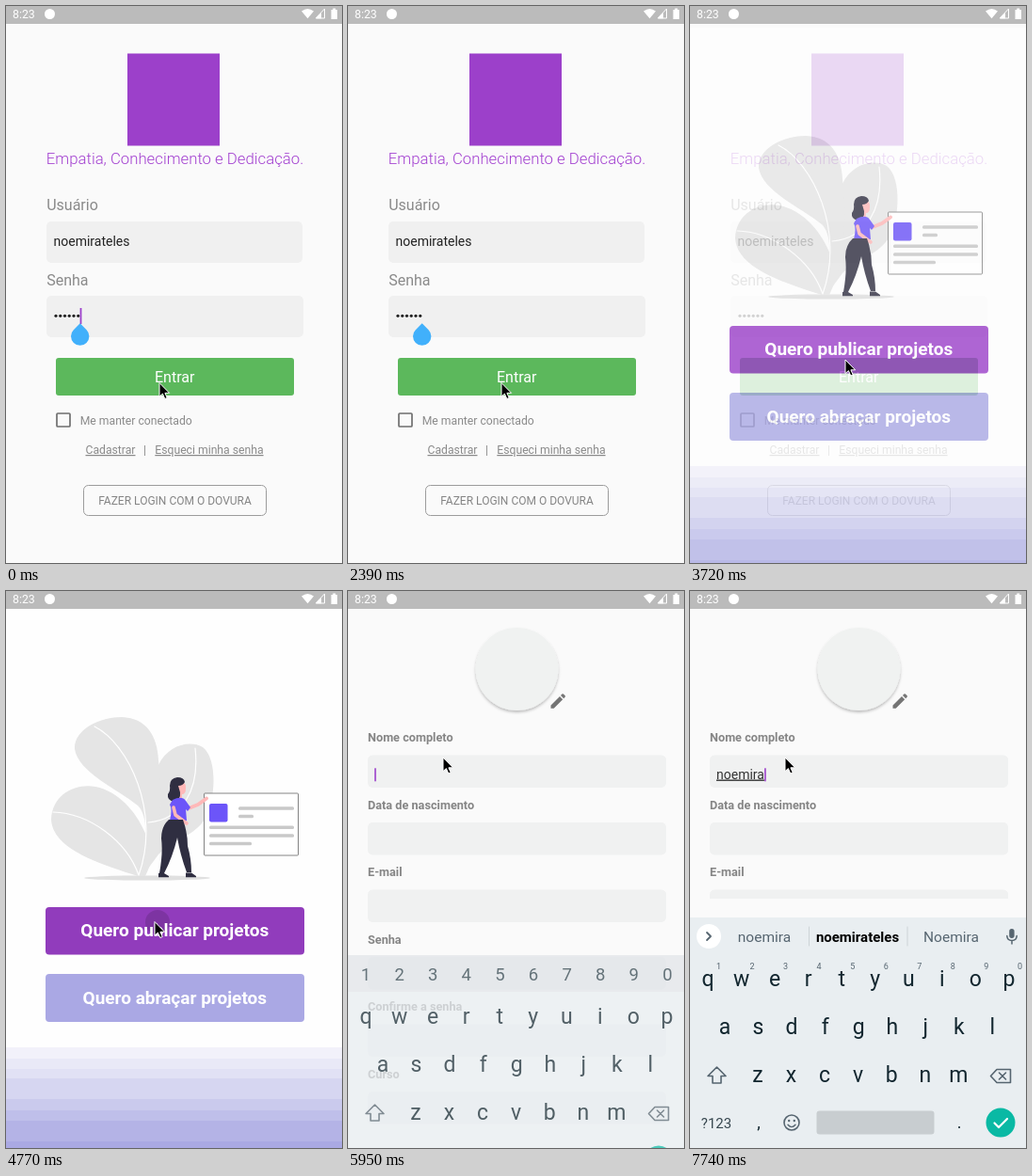
Animation, 357 px wide and 592 px high, one loop 8 s. Source, as an HTML page:

```html
<!DOCTYPE html>
<html lang="pt-BR">
<head>
<meta charset="utf-8">
<title>Login e cadastro</title>
<style>
html, body { margin: 0; width: 100%; height: 100%; overflow: hidden; background: #fafafa; }
svg { display: block; width: 100vw; height: 100vh; }
text { font-family: Roboto, "Noto Sans", sans-serif; white-space: pre; }
</style>
</head>
<body>
<svg id="stage" viewBox="0 0 357 592" xmlns="http://www.w3.org/2000/svg"></svg>
<script>
const LOOP = 8000;
const USER = 'noemirateles', NAME = 'noemira';
const PURPLE = '#9c40ca', DARK = '#2f2e41', SKIN = '#ffb8b8', VIOLET = '#6c55f9';

// Markup helpers
const rect = (x, y, w, h, fill, r = 0, more = '') =>
  `<rect x="${x}" y="${y}" width="${w}" height="${h}" rx="${r}" fill="${fill}" ${more}/>`;
const circle = (x, y, r, fill, more = '') =>
  `<circle cx="${x}" cy="${y}" r="${r}" fill="${fill}" ${more}/>`;
const path = (d, fill, more = '') => `<path d="${d}" fill="${fill}" ${more}/>`;
const line = (d, color, w, more = '') =>
  path(d, 'none', `stroke="${color}" stroke-width="${w}" stroke-linecap="round" stroke-linejoin="round" ${more}`);
const text = (s, x, y, size, fill, more = '') =>
  `<text x="${x}" y="${y}" font-size="${size}" fill="${fill}" ${more}>${s}</text>`;
const mid = (s, x, y, size, fill, more = '') =>
  text(s, x, y, size, fill, 'text-anchor="middle" ' + more);
const group = (id, body, more = '') => `<g id="${id}" ${more}>${body}</g>`;
const BOLD = 'font-weight="700"', LINK = 'style="text-decoration: underline .8px"';
const times = (n, f) => Array.from({ length: n }, (_, i) => f(i)).join('');

const statusBar = () =>
  rect(0, 0, 357, 19, '#bbbbbb') +
  text('8:23', 7, 13, 12.3, '#fff') +
  circle(46.5, 8.5, 5.5, '#fff') +
  path('M314 5.5Q320.5 0.5 327 5.5L320.5 13.3Z', '#fff') +
  path('M329.5 13V12.5L338.5 3V13Z', 'none', 'stroke="#fff"') +
  path('M329 13.3L335 7V13.3Z', '#fff') +
  path('M345.5 4H347.3V2.5H350.2V4H352V14H345.5Z', '#fff');

const login = () => {
  const gray = '#8a8a8a';
  return rect(0, 0, 357, 592, '#fafafa') +
    rect(129, 50.5, 98, 98, PURPLE) +
    mid('Empatia, Conhecimento e Dedicação.', 179.5, 168, 16.75, '#a23fd0', 'font-weight="300"') +
    text('Usuário', 43.2, 217, 16, gray) +
    rect(43, 229, 272, 44, '#f0f0f0', 5) +
    text(USER, 50.5, 255, 14, '#222') +
    text('Senha', 43.2, 296.7, 16, gray) +
    rect(43, 308, 273, 44, '#f0f0f0', 5) +
    times(6, i => circle(53 + i * 4.75, 329.3, 1.6, '#222')) +
    rect(78.6, 321, 1.8, 17, PURPLE, 0, 'id="passCaret"') +
    path('M78.7 337.2L85.6 344.2A9.7 9.7 0 1 1 71.8 344.2Z', '#41b0fb', 'id="handle"') +
    rect(53, 374, 253, 40, '#5cb85c', 3) +
    mid('Entrar', 179.2, 399.8, 16, '#fff') +
    rect(54, 433, 14, 14, 'none', 1, 'stroke="#6e6e6e" stroke-width="1.7"') +
    text('Me manter conectado', 78.7, 444.5, 12.2, gray) +
    text('Cadastrar', 84.5, 476, 12.2, gray, LINK) +
    text('|', 146, 476, 12.2, gray) +
    text('Esqueci minha senha', 158.3, 476, 12.2, gray, LINK) +
    rect(82.5, 509.5, 194, 32, 'none', 5, 'stroke="#9c9c9c"') +
    mid('FAZER LOGIN COM O DOVURA', 179.5, 529.5, 12, '#858585');
};

const plant = () => {
  const leaf = '#e5e5e5';
  return `<ellipse cx="150" cy="305" rx="67" ry="2.6" fill="#e0e0e0"/>` +
    path('M145 303C150 260 148 215 162 185C172 164 195 158 209 166C224 178 222 213 216 232C207 261 178 262 162 280Z', leaf) +
    path('M141 303C150 270 152 240 140 228C118 210 77 193 73 168C72 147 100 134 123 134C150 135 161 155 162 180C167 225 164 270 148 303Z', leaf) +
    path('M140 303C100 290 50 275 48 243C49 215 75 204 95 208C125 214 146 245 152 270L148 303Z', leaf) +
    line('M94 144C130 162 165 235 141 302M50 235C88 236 128 265 141 302M201 167C206 212 187 243 151 246', '#fff', 1.2);
};

const woman = () =>
  line('M194 231L204 227L213 220.5', SKIN, 4) +
  path('M184 203Q192 202 191 210Q191 216 187 216L187 222H180V212Z', SKIN) +
  path('M190 203Q189 198 182 198Q174 199 174 207Q175 212 172 216Q171 222 178 224Q186 222 185 214L183 207Q188 207 190 203Z', DARK) +
  path('M177 222Q187 217 191 223L196 230L193 234L191 232L192 244H174Q177 232 174 227Z', VIOLET) +
  line('M178 230L180 238L192 247', SKIN, 3.6) +
  path('M173 243H188Q193 257 193 271Q197 285 197 299H192Q185 280 182 262Q177 283 168 300H163Q167 278 165 263Q165 250 173 243Z', DARK) +
  path('M162 300H168L173 303V304.3H162ZM191 299.5H197L202 303V304.3H191Z', DARK);

const card = () => {
  const bars = [[247, 231, 59], [247, 239.5, 16], [216, 251.3, 90], [216, 260, 90], [216, 268.5, 45]];
  return rect(210.5, 215, 100, 66, '#fff', 1, 'stroke="#777" stroke-width=".9"') +
    rect(216, 226, 19.5, 19.5, VIOLET, 2) +
    bars.map(([x, y, w]) => rect(x, y - 1.7, w, 3.5, '#c9c9c9', 1.5)).join('');
};

const choice = () => {
  const bands = [[485, '#f2f1fa'], [497, '#e9e9f7'], [508, '#e1e1f5'], [518, '#d6d6f1'],
    [540, '#cacaed'], [552, '#bfbfea'], [563, '#b4b3e6'], [585, '#aaa9e3']];
  return rect(0, 19, 357, 573, '#fefefe') +
    bands.map(([y, c]) => rect(0, y, 357, 592 - y, c)).join('') +
    plant() + card() + woman() +
    rect(42, 336, 275, 50.5, PURPLE, 4) +
    rect(42, 336, 275, 50.5, '#000', 4, 'id="press" opacity="0"') +
    circle(161, 352, 13, '#000', 'id="ripple" opacity="0" clip-path="url(#btn)"') +
    mid('Quero publicar projetos', 179.3, 367, 19, '#fff', BOLD) +
    rect(42, 407, 275, 51, '#aaa8e4', 4) +
    mid('Quero abraçar projetos', 179.3, 438.8, 19, '#fff', BOLD);
};

const form = () => {
  const labels = ['Nome completo', 'Data de nascimento', 'E-mail', 'Senha', 'Confirme a senha', 'Curso'];
  return rect(0, 19, 357, 573, '#fafafa') +
    circle(179.5, 83, 44, '#f0f2f1', 'filter="url(#shadow)"') +
    path('M215.5 121.5L225 112L228.2 115.2L218.7 124.7H215.5ZM226 111L227.4 109.6Q228.4 109 229.2 109.8L230.7 111.3Q231.3 112.2 230.6 112.8L229.2 114.2Z', '#757575') +
    labels.map((s, i) =>
      text(s, 21, 160 + i * 71.5, 12.7, '#858585', BOLD) +
      rect(21, 174.5 + i * 71.5, 317, 34.5, '#f0f1f1', 5)).join('') +
    text('', 28, 199.5, 14, '#333', `id="typed" ${LINK}`) +
    rect(28, 188.3, 1.6, 14, PURPLE, 0, 'id="nameCaret"');
};

const keyboard = () => {
  const ink = '#12262f', soft = '#566570';
  const row = (keys, x, y) => [...keys].map((k, i) => mid(k, x + i * 35.55, y, 23, ink)).join('');
  const digits = '1234567890';
  const numbers = rect(0, 347, 357, 39, '#e2e5e9') +
    [...digits].map((d, i) => mid(d, 19 + i * 35.6, 374, 18.5, '#2f434c')).join('');
  const words = line('M126.5 357V377M231 357V377', '#cdd3d6', 1) +
    mid('', 79, 373, 15.5, soft, 'id="left"') +
    mid(USER, 178, 373, 15, '#000', BOLD) +
    mid('', 277.5, 373, 15.5, soft, 'id="right"');
  const strip = circle(20, 367, 13, '#fff') +
    line('M18 363L22 367L18 371', soft, 1.8, 'id="chevron"') +
    rect(339.2, 359, 5.4, 10, soft, 2.7) +
    line('M336.8 366.5Q337 371.5 342 371.5Q347 371.5 347.2 366.5M342 372V375', soft, 1.5) +
    [...digits].map((d, i) => mid(d, 30.5 + i * 35.55, 402, 9, soft)).join('') +
    group('words', words);
  return rect(0, 347, 357, 245, '#e9eef1') +
    group('numbers', numbers) + group('strip', strip) +
    row('qwertyuiop', 19, 419.5) + row('asdfghjkl', 37, 470.5) + row('zxcvbnm', 72, 522) +
    line('M28.5 506L38 515.5H33V523H24V515.5H19Z', soft, 1.6) +
    line('M326 508.5H340.5V522.5H326L319.5 515.5ZM328.5 512L335.5 519M335.5 512L328.5 519', soft, 1.6) +
    mid('?123', 28, 570.5, 15, '#37474f') +
    mid(',', 73, 571, 18, ink) + mid('.', 286, 571, 18, ink) +
    circle(108, 565, 8, 'none', `stroke="${soft}" stroke-width="1.6"`) +
    circle(105.2, 563, 1.2, soft) + circle(110.8, 563, 1.2, soft) +
    line('M104 567.2Q108 572 112 567.2', soft, 1.4) +
    rect(134.5, 552.5, 125, 25, '#c8cdd0', 3) +
    circle(330, 565, 15.5, '#0ab9a4') +
    line('M323.5 565.5L328 570L337 561', '#fff', 2.2);
};

const stage = document.getElementById('stage');
stage.innerHTML =
  `<defs>
    <clipPath id="btn"><rect x="42" y="336" width="275" height="50.5" rx="4"/></clipPath>
    <filter id="shadow" x="-20%" y="-20%" width="140%" height="140%">
      <feDropShadow dx="0" dy="2" stdDeviation="1.6" flood-opacity=".25"/>
    </filter>
  </defs>` +
  group('login', login()) + group('choice', choice()) + group('form', form()) +
  rect(0, 327, 357, 20, '#fafafa', 0, 'id="cut"') +
  group('keyboard', keyboard()) + statusBar() +
  group('mouse', path('M0 0V14.6L3.4 11.6L5.8 17L8.2 16L5.9 10.8H10.6Z', '#000', 'stroke="#fff" stroke-width="1"'));

const el = {};
stage.querySelectorAll('[id]').forEach(n => el[n.id] = n);

// Held steps: [start, ...values]
const steps = {
  mouse: [[0, 163, 400.5], [2980, 166, 399], [3130, 169, 396.5], [3720, 165, 376],
    [3870, 160, 358], [4020, 158, 351.5], [5360, 128, 262], [5510, 101, 177]],
  passCaret: [[0, 1], [450, 0], [900, 1], [1500, 0], [1940, 1], [2390, 0], [2980, 1], [3420, 0]],
  choice: [[0, 0, 50], [3420, .1, 42], [3570, .4, 25], [3720, .8, 4], [3870, 1, 0]],
  press: [[0, 0], [4770, .07], [5070, 0]],
  ripple: [[0, 0, 13], [4770, .14, 13], [4920, .08, 40], [5070, 0, 60]],
  form: [[0, 0, 50], [4920, .3, 27], [5070, .75, 2.5], [5210, 1, 0]],
  nameCaret: [[0, 0], [5950, 1], [6550, 0], [6850, 1]],
  keyboard: [[0, 0, 40], [5950, .72, 40], [6100, 1, 0]],
  letters: [[0, 0], [6850, 1], [7000, 2], [7150, 3], [7300, 4], [7440, 5], [7590, 6], [7740, 7]]
};
const at = (key, t) => steps[key].filter(s => s[0] <= t).pop().slice(1);
const show = (node, on) => node.setAttribute('visibility', on ? 'visible' : 'hidden');
const move = (node, x, y) => node.setAttribute('transform', `translate(${x} ${y})`);

function draw(t) {
  move(el.mouse, ...at('mouse', t));
  for (const id of ['choice', 'form', 'keyboard']) {
    const [opacity, y] = at(id, t);
    el[id].style.display = opacity ? '' : 'none';
    el[id].setAttribute('opacity', opacity);
    move(el[id], 0, y);
  }
  for (const id of ['passCaret', 'nameCaret', 'press', 'ripple'])
    el[id].setAttribute('opacity', at(id, t)[0]);
  el.ripple.setAttribute('r', at('ripple', t)[1]);
  show(el.handle, t < 3420);

  const ready = t >= 6100, n = at('letters', t)[0], typed = NAME.slice(0, n);
  show(el.cut, ready);
  show(el.numbers, !ready);
  el.strip.style.display = ready ? '' : 'none';
  el.words.style.display = n ? '' : 'none';
  el.chevron.setAttribute('transform', n ? '' : 'rotate(180 20 367)');
  el.typed.textContent = el.left.textContent = typed;
  el.right.textContent = typed.charAt(0).toUpperCase() + typed.slice(1);
  el.nameCaret.setAttribute('x', 28.2 + (n ? el.typed.getComputedTextLength() : 0));
}

const start = performance.now();
(function tick() {
  draw((performance.now() - start) % LOOP);
  requestAnimationFrame(tick);
})();
</script>
</body>
</html>
```
